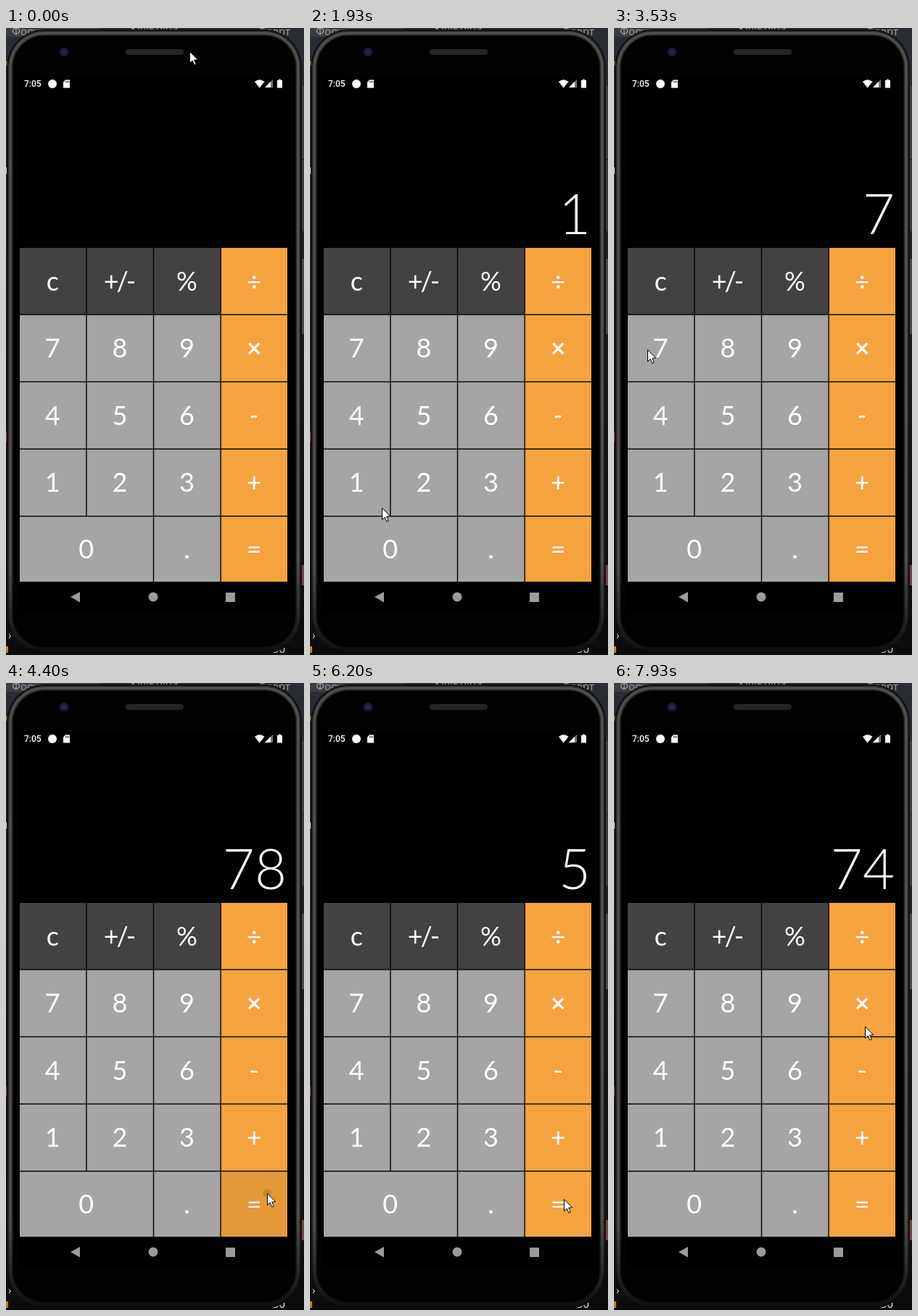
These frames come from a looping animation (411 px wide and 864 px high, 8000 ms). An HTML page with a canvas:

```html
<!DOCTYPE html>
<html lang="en">
<head>
<meta charset="utf-8">
<title>Calculator</title>
<style>
  html, body { margin: 0; width: 100%; height: 100%; overflow: hidden; background: #111; }
  canvas { display: block; }
</style>
</head>
<body>
<canvas id="stage" width="411" height="864"></canvas>
<script>
const W = 411, H = 864, LOOP = 8000, FPS = 15;
const ctx = document.getElementById('stage').getContext('2d');

const GRID = { x: 19, y: 303, bottom: 763, pitch: 92.6, key: 91.2 };
const KEYS = ['c +/- % ÷', '7 8 9 ×', '4 5 6 -', '1 2 3 +', '0 0 . ='].map(row => row.split(' '));
const DARK = '#424242', GREY = '#a5a5a5', ORANGE = '#f4a33f';

// Steps are fifteenths of a second. RELEASE is the delay between press and result.
const RELEASE = 2;
const TAPS = [[22, '1'], [45, '+'], [51, '7'], [58, '8'], [65, '='], [84, '-'], [88, '5'], [94, '=']]
  .map(([at, key]) => ({ at, key }));

// Each stroke eases to a point; bow pushes the middle of the path sideways.
const HOME = { x: 253, y: 32 };
const STROKES = [
  { from: 1, to: 13, x: 80, y: 628, bow: 25 },
  { from: 15, to: 19, x: 69, y: 633 },
  { from: 28, to: 34, x: 323, y: 635, bow: 56 },
  { from: 37, to: 41, x: 324, y: 629 },
  { from: 46, to: 50, x: 74, y: 446 },
  { from: 51, to: 53, x: 46, y: 443 },
  { from: 54, to: 58, x: 144, y: 446 },
  { from: 59, to: 63, x: 360, y: 703 },
  { from: 67, to: 77, x: 319, y: 568, bow: -42 },
  { from: 77, to: 81, x: 335, y: 527 },
  { from: 85, to: 88, x: 132, y: 537 },
  { from: 89, to: 93, x: 350, y: 711 },
  { from: 96, to: 107, x: 330, y: 575 },
  { from: 108, to: 119, x: 346, y: 473, bow: 12 }
];

function fillRect(c, color, x, y, w, h) {
  c.fillStyle = color;
  c.fillRect(x, y, w, h);
}

function fillRounded(c, color, x, y, w, h, r) {
  c.fillStyle = color;
  c.beginPath();
  c.roundRect(x, y, w, h, r);
  c.fill();
}

function fillPolygon(c, color, points) {
  c.fillStyle = color;
  c.beginPath();
  points.forEach(([x, y]) => c.lineTo(x, y));
  c.closePath();
  c.fill();
}

function disc(c, color, x, y, r) {
  c.fillStyle = color;
  c.beginPath();
  c.arc(x, y, r, 0, Math.PI * 2);
  c.fill();
}

function label(c, text, x, y, font, color = '#fff', align = 'center') {
  c.font = font;
  c.fillStyle = color;
  c.textAlign = align;
  c.fillText(text, x, y);
}

function keyBox(row, col, span = 1) {
  const { x, y, bottom, pitch, key } = GRID;
  const top = y + row * pitch;
  return [x + col * pitch, top, key + (span - 1) * pitch, Math.min(key, bottom - top)];
}

function drawBackdrop(c) {
  const dusk = c.createLinearGradient(0, 0, 0, H);
  dusk.addColorStop(0, '#2b2d35');
  dusk.addColorStop(0.5, '#1b1c23');
  dusk.addColorStop(1, '#0b0b0e');
  fillRect(c, dusk, 0, 0, W, H);
  fillRect(c, '#3c3e46', 0, 0, 128, 12);
  const font = '15px "Open Sans", sans-serif';
  label(c, 'Форум', 8, 10, font, '#a2a3a7', 'left');
  label(c, 'Культура', 172, 6, font, '#a2a3a7', 'left');
  label(c, 'Спорт', 392, 10, font, '#a2a3a7', 'right');
  fillRect(c, '#c47822', 0, 46, 2, 6);
  fillRect(c, '#ccc', 0, 192, 2, 9);
  fillRect(c, '#a24216', 0, 556, 2, 14);
  fillRect(c, '#3d3f48', 407, 80, 4, 100);
  fillRect(c, '#aaa', 409, 266, 2, 10);
  fillRect(c, '#70463e', 408, 740, 3, 28);
  fillRect(c, '#c47822', 0, 852, 3, 9);
  label(c, '›', 3, 842, font, '#ddd', 'left');
  label(c, '50', 385, 861, font, '#eee', 'right');
}

function drawPhone(c) {
  fillRect(c, '#3b3b3b', 407, 182, 4, 98);
  fillRect(c, '#4a4a4a', 407, 318, 4, 104);
  // Nested outlines shade the rounded metal rim.
  const rim = 9;
  for (let i = 0; i <= rim; i++) {
    const shade = Math.round(12 + 72 * Math.sin(Math.PI * i / rim) ** 2);
    const metal = c.createLinearGradient(0, 0, 0, H);
    metal.addColorStop(0.85, `rgb(${shade},${shade},${shade})`);
    metal.addColorStop(1, '#0c0c0c');
    fillRounded(c, metal, 1 + i, 2 + i, 407 - 2 * i, 860 - 2 * i, 52 - i);
  }
  fillRounded(c, '#020202', 10, 11, 389, 842, 43);

  disc(c, '#1b1b20', 80, 33, 6.5);
  disc(c, '#20204a', 80, 33, 4);
  disc(c, '#34346c', 80, 33, 1.5);
  fillRounded(c, '#252525', 165, 29, 80, 8, 4);
  fillRect(c, '#000', 19, 67, 370, 738);
}

function drawStatusBar(c) {
  label(c, '7:05', 25, 81, '500 12px Roboto, sans-serif', '#fff', 'left');
  disc(c, '#fff', 64, 77, 6);

  fillPolygon(c, '#fff', [[82, 71.5], [88, 71.5], [88, 82.5], [79, 82.5], [79, 74.5]]);
  for (let x = 82; x < 88; x += 2) fillRect(c, '#000', x, 73, 0.9, 2.4);

  c.fillStyle = '#fff';
  c.beginPath();
  c.moveTo(349.7, 82.5);
  c.lineTo(343, 74);
  c.quadraticCurveTo(349.7, 68.5, 356.5, 74);
  c.fill();

  fillPolygon(c, '#777', [[357, 82], [368, 71], [368, 82]]);
  fillPolygon(c, '#fff', [[357, 82], [365, 74], [365, 82]]);
  fillRect(c, '#fff', 374, 72, 7, 10.5);
  fillRect(c, '#fff', 376, 70.7, 3, 2);
}

function drawNavBar(c) {
  const color = '#9b9b9b';
  fillPolygon(c, color, [[89, 784], [102, 777], [102, 791.5]]);
  disc(c, color, 203, 784, 6.5);
  fillRect(c, color, 303, 778, 13, 13);
}

function drawKeypad(c) {
  const tracking = -3;
  c.letterSpacing = `${tracking}px`;
  KEYS.forEach((line, row) => line.forEach((text, col) => {
    if (line[col - 1] === text) return;
    const [x, y, w, h] = keyBox(row, col, line[col + 1] === text ? 2 : 1);
    fillRect(c, col === 3 ? ORANGE : row === 0 ? DARK : GREY, x, y, w, h);
    const weight = text === '×' ? 700 : 400;
    label(c, text, x + (w + tracking) / 2 - 0.3, y + h / 2 + 13, `${weight} 36px Lato, sans-serif`);
  }));
}

function buildScene() {
  const layer = document.createElement('canvas');
  layer.width = W;
  layer.height = H;
  const c = layer.getContext('2d');
  [drawBackdrop, drawPhone, drawStatusBar, drawNavBar, drawKeypad].forEach(draw => draw(c));
  return layer;
}

// Runs every key released so far through a small calculator.
function readout(step) {
  let total = 0, sign = 1, entry = '';
  for (const { at, key } of TAPS) {
    if (at + RELEASE > step) break;
    if (key === '=') {
      entry = String(total + sign * entry);
    } else if (key === '+' || key === '-') {
      total = Number(entry);
      sign = key === '+' ? 1 : -1;
      entry = '';
    } else {
      entry += key;
    }
  }
  return entry;
}

function pointerAt(step) {
  let { x, y } = HOME;
  for (const { from, to, x: endX, y: endY, bow = 0 } of STROKES) {
    if (step <= from) break;
    const k = Math.min(1, (step - from) / (to - from));
    const ease = (k + k * k * (3 - 2 * k)) / 2;
    const dx = endX - x, dy = endY - y;
    const side = bow * Math.sin(Math.PI * k) / Math.hypot(dx, dy);
    x += dx * ease - dy * side;
    y += dy * ease + dx * side;
  }
  return { x: Math.round(x), y: Math.round(y) };
}

function drawPointer({ x, y }) {
  ctx.save();
  ctx.translate(x + 0.5, y + 0.5);
  fillPolygon(ctx, '#fff', [[0, 0], [0, 16], [3.7, 12.6], [6.4, 18.6], [8.8, 17.5], [6.2, 11.7], [11, 11.3]]);
  ctx.strokeStyle = '#000';
  ctx.stroke();
  ctx.restore();
}

function drawPress(step, { at, key }) {
  const row = KEYS.findIndex(line => line[3] === key);
  const age = step - at;
  if (row < 0 || age < 0 || age > 4) return;
  const fade = Math.min(1, (5 - age) / 4);
  const { x, y } = pointerAt(at);
  ctx.save();
  ctx.beginPath();
  ctx.rect(...keyBox(row, 3));
  ctx.clip();
  fillRect(ctx, `rgba(0,0,0,${0.06 * fade})`, 0, 0, W, H);
  disc(ctx, `rgba(0,0,0,${0.13 * fade})`, x, y, 6 + 20 * Math.max(0, age - 1));
  ctx.restore();
}

const scene = buildScene();

function render(time) {
  const step = Math.floor((time % LOOP + 5) * FPS / 1000) % (LOOP * FPS / 1000);
  ctx.drawImage(scene, 0, 0);
  TAPS.forEach(tap => drawPress(step, tap));
  label(ctx, readout(step), 387, 283.5, '300 76px Lato, sans-serif', '#fff', 'right');
  drawPointer(pointerAt(step));
}

let origin;
function tick(now) {
  origin ??= now;
  render(now - origin);
  requestAnimationFrame(tick);
}
render(0);
requestAnimationFrame(tick);
</script>
</body>
</html>
```
